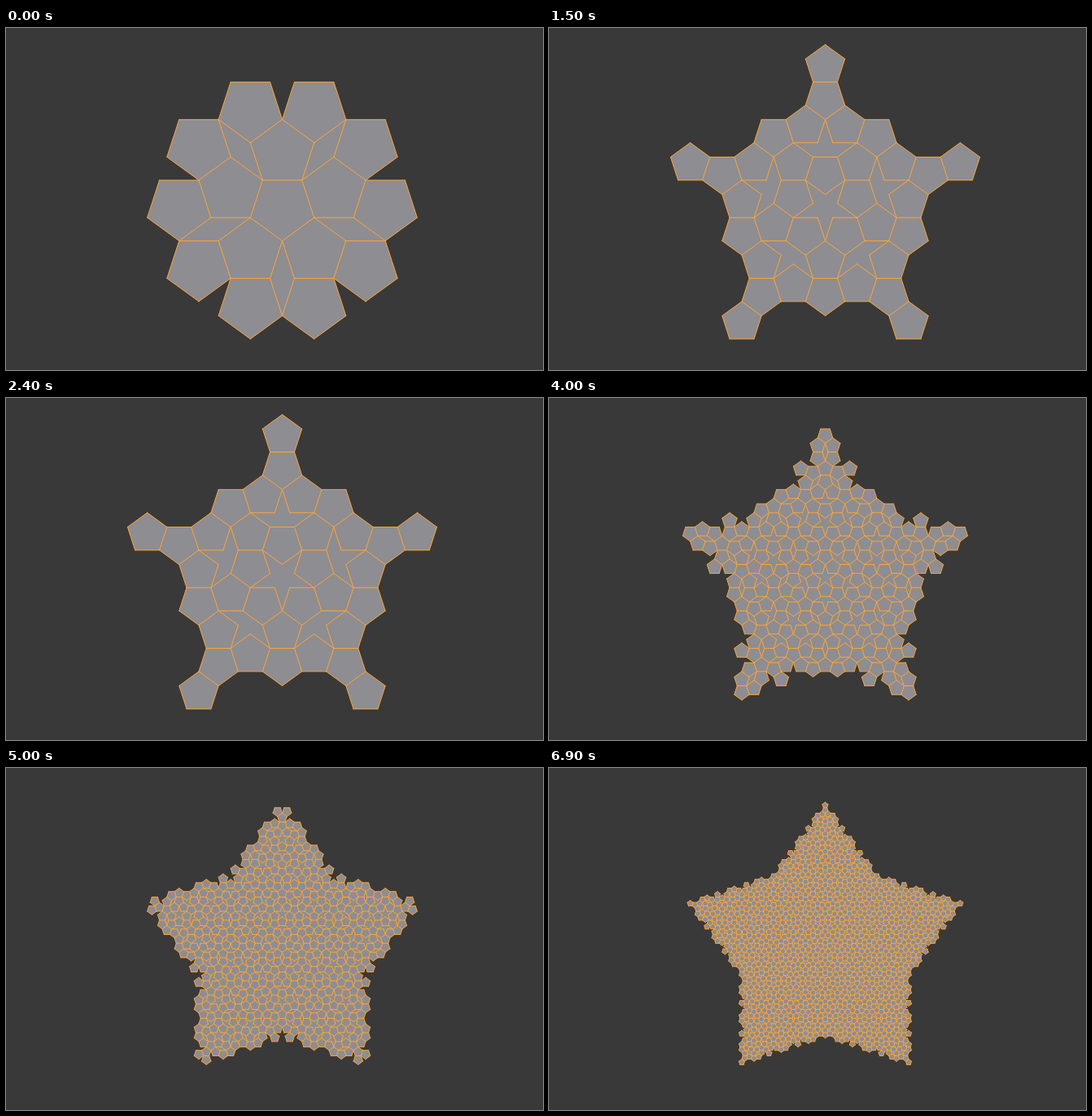
These frames come from a looping animation (660x420 px, 7500 ms). An HTML page with a canvas:

```html
<!DOCTYPE html>
<html lang="en">
<head>
<meta charset="utf-8">
<title>Pentagon tiling</title>
<style>
  html, body { margin: 0; width: 100%; height: 100%; overflow: hidden; background: #393939; }
  canvas { display: block; width: 660px; height: 420px; }
</style>
</head>
<body>
<canvas id="stage" width="660" height="420"></canvas>
<script>
const ctx = document.getElementById('stage').getContext('2d');
const PHI = (1 + Math.sqrt(5)) / 2;
const STEP = Math.PI / 5;
const UNIT = 107.8, CX = 339.5, CY = 220.2;
const HOLDS = [1500, 1500, 1000, 1000, 1000, 1500];
const LOOP = HOLDS.reduce((a, b) => a + b);

const polar = (r, a) => [r * Math.cos(a), r * Math.sin(a)];
const sub = (p, q) => [p[0] - q[0], p[1] - q[1]];
const golden = (p, q) => [p[0] + (q[0] - p[0]) / PHI, p[1] + (q[1] - p[1]) / PHI];
const key = p => Math.round(p[0] * 1000) + ',' + Math.round(p[1] * 1000);
const toStage = p => [CX + p[0] * UNIT, CY - p[1] * UNIT];

// Five thick rhombs around the centre, cut into obtuse triangles.
function seed() {
  const tris = [];
  for (let i = 0; i < 10; i++) {
    const a = Math.PI / 2 + i * STEP;
    const tip = i % 2 ? a + STEP : a;
    const notch = i % 2 ? a : a + STEP;
    tris.push({ thin: false, a: polar(1, notch), b: polar(PHI, tip), c: [0, 0] });
  }
  return tris;
}

// Penrose rhomb deflation on half rhombs.
function deflate(tris) {
  return tris.flatMap(({ thin, a, b, c }) => {
    if (thin) {
      const p = golden(a, b);
      return [{ thin: true, a: c, b: p, c: b }, { thin: false, a: p, b: c, c: a }];
    }
    const q = golden(b, a), r = golden(b, c);
    return [
      { thin: false, a: r, b: c, c: a },
      { thin: false, a: q, b: r, c: b },
      { thin: true, a: r, b: q, c: a }
    ];
  });
}

// One pentagon per a or b corner, one side facing the other corner.
function pentagonSides(tris) {
  const seen = new Set(), sides = new Map();
  const add = (p, toward) => {
    if (seen.has(key(p))) return;
    seen.add(key(p));
    const d = sub(toward, p);
    const r = Math.hypot(...d) / 2 / Math.cos(STEP);
    const turn = Math.atan2(d[1], d[0]) + STEP;
    const corner = k => {
      const v = polar(r, turn + k * 2 * STEP);
      return [p[0] + v[0], p[1] + v[1]];
    };
    for (let k = 0; k < 5; k++) {
      const u = corner(k), v = corner(k + 1);
      sides.set(key(u) + '>' + key(v), { u, v });
    }
  };
  for (const { a, b } of tris) {
    add(a, b);
    add(b, a);
  }
  return sides;
}

const mate = (sides, { u, v }) => sides.has(key(v) + '>' + key(u));

function turnAngle(e, f) {
  const d = sub(e.v, e.u), g = sub(f.v, f.u);
  return Math.atan2(d[0] * g[1] - d[1] * g[0], d[0] * g[0] + d[1] * g[1]);
}

// Follow the free sides around the outside, always turning hard right.
function outline(sides) {
  const from = new Map();
  let first = null;
  for (const e of sides.values()) {
    if (mate(sides, e)) continue;
    const k = key(e.u);
    from.set(k, [...(from.get(k) || []), e]);
    if (!first || e.u[1] > first.u[1]) first = e;
  }
  const path = new Path2D();
  let e = first;
  do {
    path.lineTo(...toStage(e.u));
    e = from.get(key(e.v)).reduce((m, f) => turnAngle(e, f) < turnAngle(e, m) ? f : m);
  } while (e !== first);
  path.closePath();
  return path;
}

function lines(sides) {
  const path = new Path2D();
  for (const e of sides.values()) {
    if (mate(sides, e) && key(e.u) > key(e.v)) continue;
    path.moveTo(...toStage(e.u));
    path.lineTo(...toStage(e.v));
  }
  return path;
}

let tris = seed();
const stages = HOLDS.map(() => {
  tris = deflate(tris);
  const sides = pentagonSides(tris);
  return { body: outline(sides), edges: lines(sides) };
});

function draw(t) {
  let i = 0;
  while (t >= HOLDS[i]) t -= HOLDS[i++];
  ctx.fillStyle = '#393939';
  ctx.fillRect(0, 0, 660, 420);
  ctx.fillStyle = '#8e8d92';
  ctx.fill(stages[i].body);
  ctx.strokeStyle = '#ffa533';
  ctx.lineWidth = 1;
  ctx.lineCap = 'round';
  ctx.stroke(stages[i].edges);
}

const start = performance.now();
function tick() {
  draw((performance.now() - start) % LOOP);
  requestAnimationFrame(tick);
}
tick();
</script>
</body>
</html>
```
